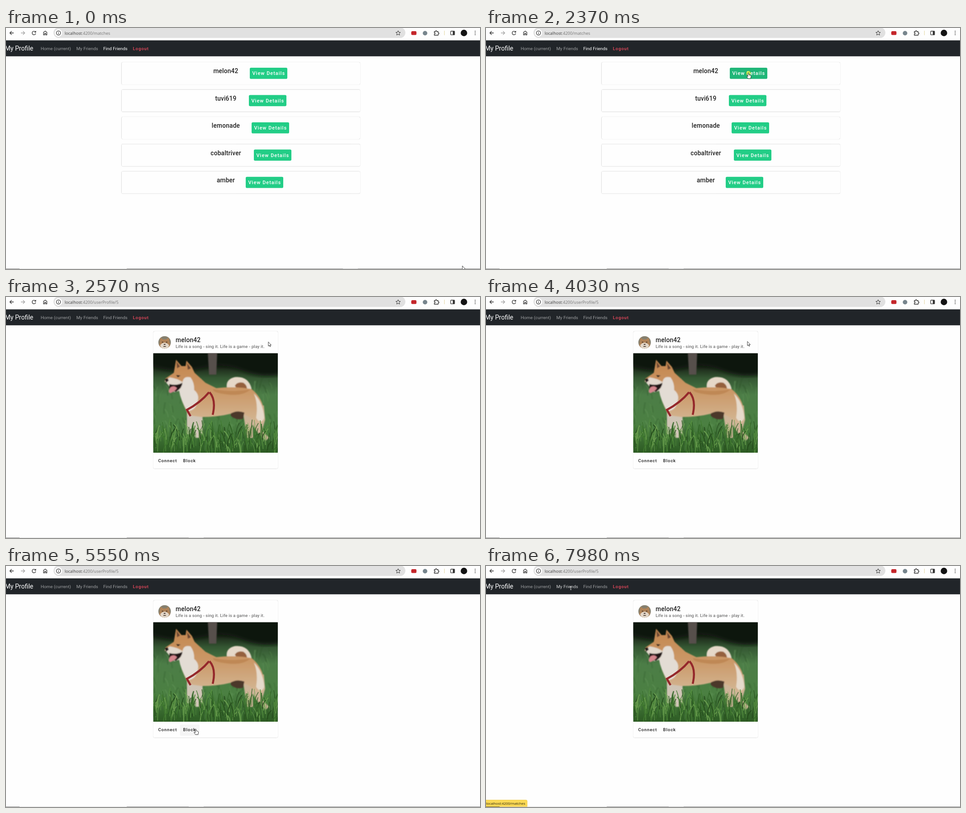
These frames come from a looping animation (1048 px wide and 534 px high, 8000 ms). An HTML page:

```html
<!DOCTYPE html>
<html lang="en">
<head>
<meta charset="utf-8">
<title>Find Friends</title>
<style>
html, body { margin: 0; width: 100%; height: 100%; overflow: hidden; background: #fefefe; }
svg { display: block; width: 100vw; height: 100vh; }
text { font-family: Roboto, sans-serif; white-space: pre; }
.url { font-family: "Open Sans", sans-serif; }
.card { fill: #fefefe; filter: drop-shadow(0 .9px .4px rgba(0,0,0,.36)) drop-shadow(0 .5px 1px rgba(0,0,0,.1)); }
.icon { fill: none; stroke: #333; stroke-width: 1.3; }
</style>
</head>
<body>
<svg id="stage" viewBox="0 0 1048 534" xmlns="http://www.w3.org/2000/svg">
  <defs>
    <linearGradient id="meadow" x1="0" y1="0" x2="0" y2="1">
      <stop offset="0" stop-color="#0f120e"/><stop offset=".13" stop-color="#182015"/>
      <stop offset=".25" stop-color="#345632"/><stop offset=".42" stop-color="#4c7d47"/>
      <stop offset=".72" stop-color="#4b8042"/><stop offset="1" stop-color="#2c5a22"/>
    </linearGradient>
    <linearGradient id="coat" x1="0" y1="0" x2="0" y2="1">
      <stop offset="0" stop-color="#c4874f"/><stop offset=".5" stop-color="#cb9867"/><stop offset="1" stop-color="#d3b795"/>
    </linearGradient>
    <filter id="soft"><feGaussianBlur stdDeviation="1"/></filter>
    <filter id="haze"><feGaussianBlur stdDeviation="4"/></filter>
    <clipPath id="frame"><rect x="325.7" y="124.7" width="275.2" height="220.2"/></clipPath>
    <clipPath id="round"><circle cx="350.7" cy="100.5" r="13.8"/></clipPath>
  </defs>

  <rect width="1048" height="534" fill="#fefefe"/>
  <g id="toolbar">
    <rect x="105" y="-1" width="778" height="23" rx="11.5" fill="#e1e1e1"/>
    <circle cx="116" cy="11" r="8.3" fill="#fff"/>
    <path class="icon" d="M17 11H8.5M12.5 7L8.5 11L12.5 15"/>
    <path class="icon" style="stroke:#a5a5a5" d="M33 11H41.5M37.5 7L41.5 11L37.5 15"/>
    <path class="icon" d="M65 8.6A4 4 0 1 0 65.7 12M65.8 6.6V9.4H63"/>
    <path class="icon" d="M83 15.3V9.5L86.7 6.7L90.4 9.5V15.3H87.9V12H85.5V15.3Z"/>
    <g class="icon"><circle cx="116" cy="11" r="4.6"/><path d="M116 10.4V13.6M116 8.2V9.4"/></g>
    <path class="icon" style="stroke-width:1" d="M867 6L868.5 9.4L872.1 9.7L869.4 12.1L870.2 15.7L867 13.8L863.8 15.7L864.6 12.1L861.9 9.7L865.5 9.4Z"/>
    <rect x="896" y="7" width="11.5" height="8.5" rx="2.5" fill="#c4262b"/>
    <circle cx="926.5" cy="11.5" r="5" fill="#77858d"/>
    <path class="icon" d="M947 8H949.5Q949.5 5.8 951 5.8T952.5 8H955.5V10.5Q957.5 10.7 957.5 12T955.5 13.5V16H947V13.5Q949 13.2 949 12T947 10.5Z"/>
    <path d="M969.3 6V16" stroke="#e2d49a"/>
    <rect class="icon" x="983.2" y="7" width="8.6" height="8.2" rx="1"/>
    <rect x="987.8" y="7" width="4" height="8.2" fill="#333"/>
    <circle cx="1012.5" cy="11" r="7.2" fill="#131313"/>
    <g fill="#333"><circle cx="1037.3" cy="7.2" r="1"/><circle cx="1037.3" cy="11" r="1"/><circle cx="1037.3" cy="14.8" r="1"/></g>
    <text class="url" x="129.7" y="14.6" font-size="9.1" fill="#3c3c3c">localhost<tspan fill="#747474" id="address"></tspan></text>
  </g>
  <g id="nav"><rect y="27.4" width="1048" height="35.3" fill="#212529"/></g>
  <g id="list"></g>

  <g id="profile">
    <rect class="card" x="326" y="76" width="275" height="304.3" rx="2.8"/>
    <g clip-path="url(#round)">
      <rect x="336" y="86" width="30" height="30" fill="#85806f"/>
      <path d="M339 106L341.5 90L347 94H354L359.5 90L363 106Q360 116 350.5 116T339 106" fill="#b08358"/>
      <path d="M341 107Q344 102 350.6 101Q357 102 360.5 107Q358 116 350.6 116T341 107" fill="#e2d6c8"/>
      <path d="M344.8 100H347.6M353.8 100H356.6M348.8 104.8H352.6M348 109.5H353.5" stroke="#35251d" stroke-width="1.7"/>
    </g>
    <g clip-path="url(#frame)">
      <rect x="325" y="124" width="277" height="222" fill="url(#meadow)"/>
      <path d="M320 120H605V172Q560 180 520 162T430 158T320 152Z" fill="#10120f" filter="url(#haze)"/>
      <path d="M446 120H467L465 172H449Z" fill="#57504c" filter="url(#soft)"/>
      <g id="backGrass" opacity=".45" filter="url(#soft)"></g>
      <g filter="url(#soft)">
        <path d="M488 200Q486 182 506 177.5Q536 175 543 203Q536 212 520 207L500 203Z" fill="#e6d8c8"/>
        <path d="M506 196Q512 187 525 190Q535 197 532 207H512Z" fill="#95603c"/>
        <path d="M400 240L434 255L436 300L428 312H418L413 278L408 304H400Z" fill="#cfc4b5"/>
        <path d="M524 255L570 240L573 272L566 296L582 312L574 318L556 300L545 282L546 312H533L528 280Z" fill="#cdb497"/>
        <path d="M376 139L388 153L397 153L399 141L411 155L417 168L441 190L465 202Q505 197 543 204Q563 220 569 244L571 276Q557 287 541 268Q520 254 500 258Q468 266 432 266L404 262Q388 235 383 206L366 193L351 188L352 181L371 168Z" fill="url(#coat)"/>
        <path d="M458 204Q500 212 540 205Q524 220 490 216T458 204" fill="#b87d49" opacity=".6"/>
        <path d="M382 204L390 190Q392 174 408 178Q417 190 416 206Q428 216 424 230Q420 252 401 253Q386 230 382 204Z" fill="#e3dcd4"/>
        <path d="M351 186L362 178Q377 180 390 188L386 207L372 211Z" fill="#e2d8cc"/>
        <path d="M548 214Q568 232 571 268Q564 284 553 268Q558 236 548 214Z" fill="#e6dacb"/>
        <path d="M497 258Q511 250 527 256L524 270Q508 274 497 263Z" fill="#4b382c"/>
        <path d="M377 143L385 154L378 158ZM400 146L409 158L402 161Z" fill="#6b4632"/>
        <path d="M361 193Q378 197 390 190Q390 201 376 210L361 207Z" fill="#241917"/>
        <path d="M364 200Q372 195 378 202Q373 210 363 213Q356 210 364 200Z" fill="#d4858c"/>
        <path d="M351 182L357 180L360 185L354 190Z" fill="#1d1918"/>
        <path d="M376 173L386 174L380 178Z" fill="#1d1512"/>
      </g>
      <path d="M449 211Q430 234 400 250L408 264M450 211Q465 228 457 261" fill="none" stroke="#95282b" stroke-width="4.5"/>
      <g id="frontGrass" opacity=".85"></g>
    </g>
    <rect id="connectBg" x="330" y="351" width="54.5" height="25" rx="2.8" fill="#f5f5f5"/>
    <rect id="blockBg" x="384.5" y="351" width="43.5" height="25" rx="2.8" fill="#f5f5f5"/>
  </g>

  <rect y="533" width="1048" height="1" fill="#858585"/>
  <rect x="30" y="533" width="237" height="1" fill="#dcdcdc"/>
  <rect id="gap" y="533" width="33" height="1" fill="#bcbcbc"/>
  <g id="status">
    <path d="M-1 518.5H88.5Q91 518.5 91 521V533H-1Z" fill="#fbd954" stroke="#efce55"/>
    <path d="M0 533.5H30" stroke="#6f6330"/>
    <text class="url" x=".3" y="529" font-size="7.8" fill="#26230f">localhost:4200/matches</text>
  </g>
  <circle id="press" cx="580.3" cy="100" fill="#fe0" opacity=".5"/>
  <g id="cursor" stroke="#111" stroke-width=".8" stroke-linejoin="round" fill="#fff">
    <path id="arrow" d="M0 0V9.3L2.1 7.5L3.6 10.7L5 10.1L3.6 7H6.4Z"/>
    <path id="hand" d="M-1.1 1Q0 -.5 1.1 1V4.4L5 5.3Q6.3 5.8 6 8L5.1 12.6H-.6L-3.7 8.4Q-4 6.7 -2.5 7.2L-1.1 8.5Z"/>
    <path id="beam" d="M-1.6 -3.6H1.6M0 -3.6V3.8M-1.6 3.8H1.6" stroke="#ddd" fill="none"/>
  </g>
</svg>
<script>
const LOOP = 8000;
const NS = "http://www.w3.org/2000/svg";
const $ = id => document.getElementById(id);

function add(parent, tag, attrs, content) {
  const el = document.createElementNS(NS, tag);
  for (const key in attrs) el.setAttribute(key, attrs[key]);
  if (content) el.textContent = content;
  return parent.appendChild(el);
}

function label(parent, x, y, size, fill, content, weight = 400, spacing = 0, anchor = "start") {
  return add(parent, "text", {
    x, y, "font-size": size, fill, "font-weight": weight,
    "letter-spacing": spacing * size, "text-anchor": anchor
  }, content);
}

const show = (id, on) => $(id).setAttribute("visibility", on ? "visible" : "hidden");

// Navigation bar
const DIM = "#9b9d9f", HOVER = "#cfd0d1";
label($("nav"), -2.6, 49.8, 14.15, "#fff", "My Profile");
label($("nav"), 76.7, 49, 9.9, DIM, "Home (current)");
const myFriends = label($("nav"), 155.4, 49, 9.9, DIM, "My Friends");
const findFriends = label($("nav"), 214.9, 49, 9.9, DIM, "Find Friends");
label($("nav"), 280.5, 49, 9.63, "#f04a5e", "Logout", 500, .089);

// Match list
const rows = [["melon42", 539], ["tuvi619", 537], ["lemonade", 543], ["cobaltriver", 548], ["amber", 530]];
const buttons = rows.map(([name, x], i) => {
  const y = i * 60.45, g = $("list");
  add(g, "rect", { class: "card", x: 255.5, y: 76 + y, width: 527.5, height: 49, rx: 2.8 });
  label(g, 486, 100.2 + y, 13.75, "#212121", name, 500, .0125, "middle");
  const box = add(g, "rect", { x, y: 88 + y, width: 83, height: 24.7, rx: 2.8 });
  label(g, x + 5.5, 104.2 + y, 11, "#fff", "View Details", 500, .0893);
  return box;
});

// Profile card
const card = $("profile");
label(card, 375, 100.2, 13.75, "#212121", rows[0][0], 500, .0125);
label(card, 375, 112.7, 9.63, "#757575", "Life is a song - sing it. Life is a game - play it.", 500, .007);
label(card, 336.4, 366.4, 9.63, "#1c1c1c", "Connect", 500, .0893);
label(card, 391.6, 366.4, 9.63, "#1c1c1c", "Block", 500, .0893);

let seed = 7;
const random = () => (seed = seed * 16807 % 2147483647) / 2147483647;

function grass(parent, count, top, depth, height, colors) {
  for (let i = 0; i < count; i++) {
    const x = 322 + random() * 283, base = top + random() * depth;
    const tall = height * (.4 + random() * .6), lean = (random() - .5) * height * .6;
    add(parent, "path", {
      d: `M${x} ${base}q0 ${-tall * .6} ${lean} ${-tall}`, fill: "none",
      stroke: colors[i % colors.length], "stroke-width": 1 + random() * 1.5
    });
  }
}
grass($("backGrass"), 200, 195, 150, 26, ["#6b9c62", "#345f30", "#5b8f4f", "#2b5126"]);
grass($("frontGrass"), 230, 306, 44, 40, ["#2f6224", "#41792f", "#568f40", "#6fa352", "#264c1d"]);

// Pointer travel: first step, last step, step count, path
const moves = [
  [70, 830, 12, "M1009 527C900 420 570 240 538 142Q540 122 580 99.5"],
  [4030, 4790, 12, "M578 98.5C574 66 535 68 500 105C420 185 280 270 296 345Q305 395 345 407"],
  [4860, 5210, 6, "M345 407Q385 435 404 420Q405 390 363 361"],
  [5410, 5550, 3, "M363 361Q390 368 419.5 361"],
  [5750, 6520, 11, "M419.5 361C390 250 300 120 243 47"],
  [7640, 7980, 6, "M243 47Q215 52 187.5 48.8"]
].map(([from, to, steps, d]) => {
  const path = document.createElementNS(NS, "path");
  path.setAttribute("d", d);
  return { from, to, steps, path, length: path.getTotalLength() };
});

const ease = p => p * p * (3 - 2 * p);

function pointer(t) {
  const m = moves.filter(m => t >= m.from).pop();
  if (!m) return { x: 1009, y: 527 };
  const last = m.steps - 1;
  const step = Math.floor((t - m.from) / (m.to - m.from) * last + 1e-6);
  return m.path.getPointAtLength(m.length * ease(Math.min(1, step / last)));
}

const inside = (p, x, y, w, h) => p.x >= x && p.x <= x + w && p.y >= y && p.y <= y + h;

function draw(t) {
  const onList = t < 2570;
  const p = pointer(t);
  const clicking = t >= 2370 && onList;
  const click = t < 2440 ? 0 : t < 2500 ? 1 : 2;

  show("list", onList);
  show("profile", !onList);
  $("address").textContent = onList ? ":4200/matches" : ":4200/userProfile/5";
  $("gap").setAttribute("x", t < 2370 ? 745 : 404);

  buttons.forEach((b, i) => {
    const over = inside(p, rows[i][1], 88 + i * 60.45, 83, 24.7);
    const fill = clicking && !i ? ["#20b678", "#1daa6f", "#1ba067"][click] : over ? "#21c27f" : "#22cd86";
    b.setAttribute("fill", fill);
  });
  show("press", clicking);
  $("press").setAttribute("r", [5, 7, 8.7][click]);

  const onConnect = !onList && inside(p, 330, 351, 54.5, 25);
  const onBlock = !onList && inside(p, 384.5, 351, 43.5, 25);
  const onFind = !onList && inside(p, 210, 36, 65, 20);
  const onMine = !onList && inside(p, 150, 36, 60, 20);
  show("connectBg", onConnect);
  show("blockBg", onBlock);
  findFriends.setAttribute("fill", onList ? "#fff" : onFind ? HOVER : DIM);
  myFriends.setAttribute("fill", onMine ? HOVER : DIM);
  show("status", t >= 6480);

  const beam = t >= 7900;
  const hand = !beam && (onList ? t >= 890 : onConnect || onBlock || onFind || onMine);
  show("beam", beam);
  show("hand", hand);
  show("arrow", !beam && !hand);
  $("cursor").setAttribute("transform", `translate(${p.x} ${p.y})`);
}

const start = performance.now();
function tick() {
  draw((performance.now() - start) % LOOP);
  requestAnimationFrame(tick);
}
tick();
</script>
</body>
</html>
```
